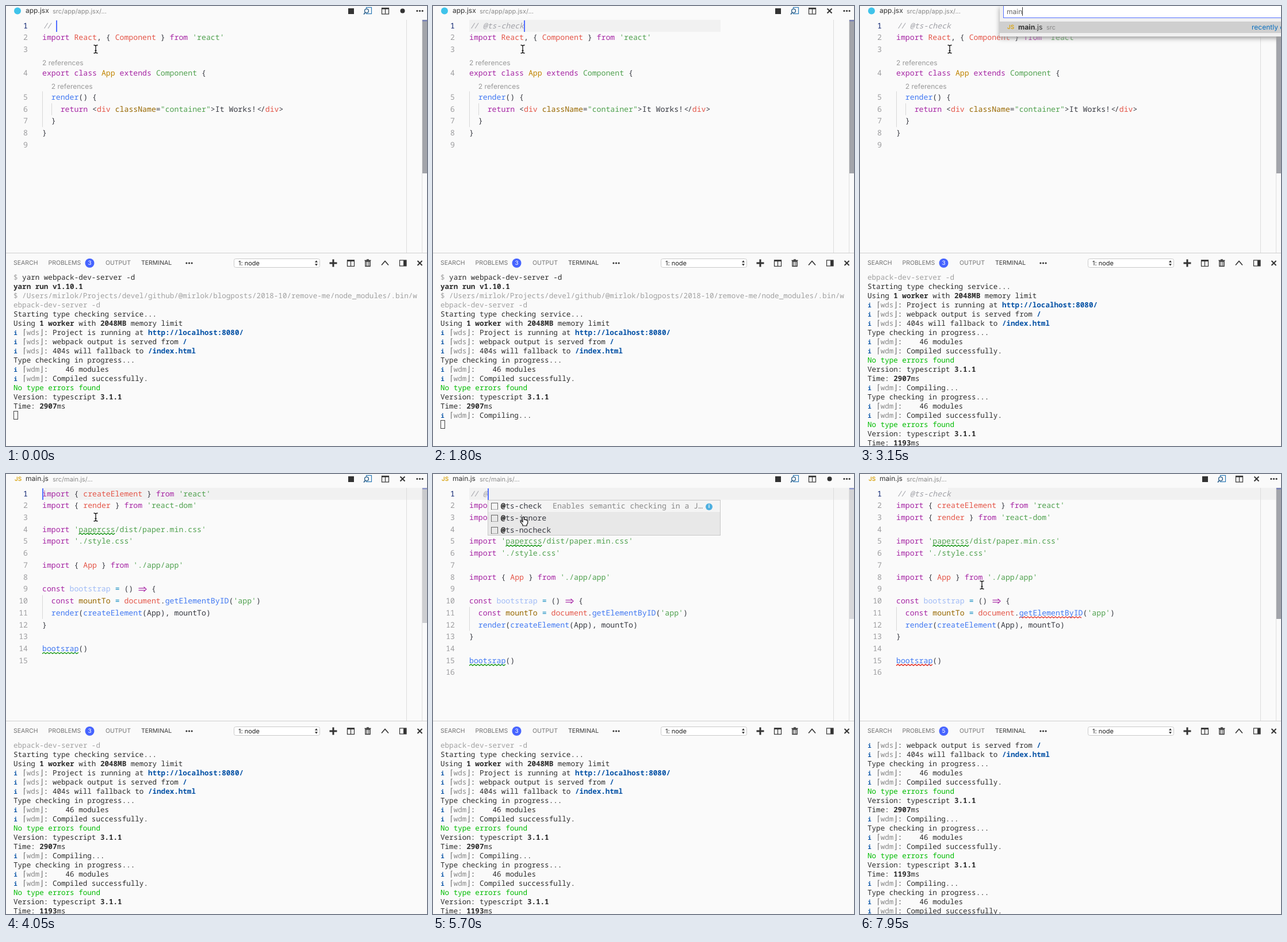
Recreate the animation shown at these times as an HTML page with a canvas. Size 732x765 px, loop 8 s.

```html
<!DOCTYPE html>
<html lang="en">
<head>
<meta charset="utf-8">
<title>Type checking a script file</title>
<style>
  html, body { margin: 0; width: 100%; height: 100%; overflow: hidden; background: #fafafa; }
  #stage { position: absolute; left: 0; top: 0; width: 732px; height: 765px; overflow: hidden;
    font-family: Inter, "Open Sans", sans-serif; text-rendering: geometricPrecision; color: #383a42; }
  #stage canvas, #text, #front { position: absolute; left: 0; top: 0; }
  .t { position: absolute; white-space: pre; line-height: 20px; }
  .code { font: 13.2px/20.73px "Noto Sans Mono", "DejaVu Sans Mono", monospace; }
  .term { font: 12.58px/16px "Noto Sans Mono", "DejaVu Sans Mono", monospace; color: #2c2c2c; }
  .num { width: 38px; text-align: right; color: #9d9d9f; }
  .num.on { color: #0b216f; }
  .lens { font-size: 12px; color: #999; }
  .lig { letter-spacing: -1.5px; padding: 0 1.5px; }
  .k { color: #a626a4 } .r { color: #e45649 } .s { color: #50a14f } .f { color: #4078f2 }
  .y { color: #c18401 } .a { color: #986801 } .o { color: #0184bc } .u { color: #a0bbf6 }
  .c { color: #a0a1a7; font-style: italic }
  .g { color: #888 } .l { color: #a0a0a0 } .n { color: #00bc00 }
  .h { color: #0451a5; font-weight: bold } .b { font-weight: bold }
  .i, .q { display: inline-block; width: 7.55px; text-align: center; line-height: 10px; }
  .i { color: #0451a5; font-weight: bold; font-size: 10.5px; }
  .q { color: #777; font-family: "DejaVu Sans Mono", monospace; font-size: 13.5px; }
  #caret { position: absolute; width: 2px; height: 20px; background: #526fff; }
  #popup { position: absolute; left: 95px; top: 45px; width: 403px; height: 60px; border: 1px solid #c8c8c8; background: #e8e8e8; overflow: hidden; }
  #popup b { color: #000; }
  #popup .first { position: absolute; left: 0; top: 0; width: 100%; height: 20px; background: #f4f4f4; }
  #popup .box { position: absolute; left: 5px; width: 10px; height: 10px; border: 1px solid #666; border-bottom-style: dotted; }
  #popup .info { position: absolute; left: 378px; top: 5px; width: 12px; height: 12px; border-radius: 6px;
    background: #4fb0e0; color: #fff; font: bold 9px/12px Inter, sans-serif; text-align: center; }
  #open { position: absolute; left: 243px; top: 0; width: 489px; background: #f0f0f0; box-shadow: 0 3px 8px #999; overflow: hidden; }
  #open .field { position: absolute; left: 6px; top: -3px; width: 500px; height: 22px; border: 1px solid #526fff; background: #fff; }
  #open .pick { position: absolute; left: 0; top: 27px; width: 100%; height: 20px; background: #cfcfcf; }
  #mouse { position: absolute; width: 24px; height: 24px; overflow: visible; }
</style>
</head>
<body>
<div id="stage">
  <canvas id="back" width="732" height="765"></canvas>
  <div id="text"></div>
  <div id="front"></div>
</div>
<script>
const LOOP = 8000, X0 = 63, CW = 7.92, Y0 = 24, LH = 20.73;
const g = document.getElementById('back').getContext('2d');
const textBox = document.getElementById('text');
const frontBox = document.getElementById('front');

// [k]word[] marks a coloured word
const mark = s => s.replace(/\[(\w)\](.*?)\[\]/g, '<span class="$1">$2</span>');
const put = (x, y, html, cls = '', style = '') =>
  `<div class="t ${cls}" style="left:${x}px;top:${y}px;${style}">${html}</div>`;
const label = (x, y, html, size, color, more = '') =>
  put(x, y - 10, html, '', `font-size:${size}px;color:${color};${more}`);
const rowY = row => Y0 + row * LH;
const colX = col => X0 + col * CW;

const comment = s => s.startsWith('//')
  ? `<span class="c"><span class="lig">//</span>${s.slice(2)}</span>` : s && `<span class="c">${s}</span>`;

const LENS = '2 references';
const appRows = [
  "[k]import[] [r]React[], { [r]Component[] } [k]from[] [s]'react'[]",
  '',
  { lens: 0 },
  '[k]export[] [k]class[] [y]App[] [k]extends[] [s]Component[] {',
  { lens: 2 },
  '  [f]render[]() {',
  '    [k]return[] &lt;[r]div[] [a]className[]=[s]"container"[]&gt;It Works!<span class="lig">&lt;/</span>[r]div[]&gt;',
  '  }',
  '}',
  ''
];
const mainRows = [
  "[k]import[] { [r]createElement[] } [k]from[] [s]'react'[]",
  "[k]import[] { [r]render[] } [k]from[] [s]'react-dom'[]",
  '',
  "[k]import[] [s]'papercss/dist/paper.min.css'[]",
  "[k]import[] [s]'./style.css'[]",
  '',
  "[k]import[] { [r]App[] } [k]from[] [s]'./app/app'[]",
  '',
  '[k]const[] [u]bootstrap[] [o]=[] ()    {',
  "  [k]const[] [a]mountTo[] [o]=[] [r]document[].[f]getElementByID[]([s]'app'[])",
  '  [f]render[]([f]createElement[](App), mountTo)',
  '}',
  '',
  '[f]bootsrap[]()',
  ''
];

const note = (tag, s) => `<span class="i">i</span> <span class="q">⌈</span>[g]${tag}[]<span class="q">⌋</span>: ${s}`;
const build = time => [
  'Type checking in progress...',
  note('wdm', '   46 modules'),
  note('wdm', 'Compiled successfully.'),
  '[n]No type errors found[]',
  'Version: typescript [b]3.1.1[]',
  `Time: [b]${time}[]ms`
];
const compiling = note('wdm', 'Compiling...');
const log = [
  '[l]$[] yarn webpack-dev-server -d',
  '[b]yarn run v1.10.1[]',
  '[l]$ /Users/mirlok/Projects/devel/github/@mirlok/blogposts/2018-10/remove-me/node_modules/.bin/w[]',
  '[l]ebpack-dev-server -d[]',
  'Starting type checking service...',
  'Using [b]1 worker[] with [b]2048MB[] memory limit',
  note('wds', 'Project is running at [h]http://localhost:8080/[]'),
  note('wds', 'webpack output is served from [h]/[]'),
  note('wds', '404s will fallback to [h]/index.html[]'),
  ...build(2907), compiling, ...build(1193), compiling, ...build(1120)
];

const files = [['JS', 'main.js', 'src'], ['', 'app.jsx', 'src/app'], ['', 'style.css', 'src'],
  ['JS', 'webpack.config.js', ''], ['', 'package.json', ''], ['', 'tsconfig.json', ''], ['', 'index.html', 'src']];

// each step changes only the listed parts of the picture
const steps = [
  [0, { file: 'app', text: '// ', caret: [0, 3], hl: null, dirty: 1, popup: 0, query: null, count: 15,
        bar: [291, 1], mouse: ['beam', 155, 75], errors: 0, dim: 1, row: 0 }],
  [300, { text: '// @', caret: [0, 4], hl: [63, 500, 0], popup: 1, mouse: ['hand', 157, 82] }],
  [750, { text: '// @ts-check', caret: [0, 12], popup: 0, mouse: ['beam', 155, 75] }],
  [1350, { dirty: 0 }],
  [1650, { count: 16 }],
  [1950, { count: 19 }],
  [2250, { query: '', caret: null, hl: null }],
  [2400, { query: 'm' }],
  [2700, { query: 'mai' }],
  [2850, { query: 'main' }],
  [3150, { count: 22 }],
  [3450, { file: 'main', text: null, query: null, hl: [63, 732, 0], caret: [0, 0], bar: [259, 1], dim: 0 }],
  [4050, { bar: [259, .5], dim: 1 }],
  [4200, { bar: [259, 0] }],
  [4500, { text: '', dirty: 1, row: 1, caret: [1, 0], hl: [63, 732, 1], bar: [252, .8] }],
  [4650, { bar: [252, .58] }],
  [4800, { row: 0, caret: [0, 0], hl: [63, 732, 0], bar: [252, .2] }],
  [4950, { text: '/', caret: [0, 1], bar: [252, 0] }],
  [5100, { text: '//', caret: [0, 2] }],
  [5250, { text: '// ', caret: [0, 3] }],
  [5550, { text: '// @', caret: [0, 4], popup: 1, mouse: ['hand', 157, 82], bar: [252, .9] }],
  [5700, { bar: [252, .4] }],
  [5850, { bar: [252, .1] }],
  [6000, { text: '// @ts-check', caret: [0, 12], popup: 0, hl: [697, 732, 0], mouse: ['beam', 155, 75], bar: [252, 0] }],
  [6600, { errors: 1, caret: null }],
  [7050, { dirty: 0, count: 23 }],
  [7200, { count: 24 }],
  [7350, { count: 26 }],
  [7650, { hl: [153, 732, 0], bar: [252, 1], mouse: ['beam', 167, 101] }],
  [7800, { mouse: ['beam', 193, 156] }],
  [7950, { mouse: ['beam', 211, 193] }]
];

function line(color, width, ...pts) {
  g.strokeStyle = color;
  g.lineWidth = width;
  g.beginPath();
  pts.forEach(([x, y], i) => i ? g.lineTo(x, y) : g.moveTo(x, y));
  g.stroke();
}
function rect(color, x, y, w, h) { g.fillStyle = color; g.fillRect(x, y, w, h); }
function frame(color, x, y, w, h, lw = 1) { g.strokeStyle = color; g.lineWidth = lw; g.strokeRect(x, y, w, h); }
function disc(color, x, y, r) { g.fillStyle = color; g.beginPath(); g.arc(x, y, r, 0, 7); g.fill(); }
function cross(x, y, r, w) {
  line('#333', w, [x - r, y - r], [x + r, y + r]);
  line('#333', w, [x + r, y - r], [x - r, y + r]);
}
function dots(x, y) { for (let i = -1; i < 2; i++) disc('#333', x + i * 4.6, y, 1.6); }
function split(x, y) {
  frame('#333', x - 5.5, y - 5, 12, 10.5, 1.2);
  rect('#333', x - 6, y - 5.5, 13, 2.6);
  line('#333', 1.2, [x + .5, y - 5], [x + .5, y + 5]);
}
function wave(color, row, col, len) {
  const y = rowY(row) + 17.8, x = colX(col), pts = [];
  for (let d = 0; d <= len * CW; d += 3) pts.push([x + d, y + (d % 6 ? -1.1 : 1.1)]);
  line(color, 1.3, ...pts);
}

function drawBack(s) {
  rect('#fafafa', 0, 0, 732, 765);
  if (s.hl) rect('#f1f1f1', s.hl[0], rowY(s.hl[2]), s.hl[1] - s.hl[0], LH);
  line('#dcdcdc', 1, [696.5, 24], [696.5, 429]);
  line('#dedede', 1, [723.5, 24], [723.5, 429]);

  // title bar icons
  if (s.file === 'app') disc('#3fc3ea', 20, 8.5, 6);
  rect('#333', 595, 4, 10, 10);
  frame('#2b79b5', 626.5, 2.5, 9, 11, 1.2);
  disc('#fafafa', 627, 8.5, 4);
  g.beginPath(); g.arc(627, 8.5, 3.4, 0, 7);
  g.strokeStyle = '#2b5f8a'; g.lineWidth = 1.4; g.stroke();
  line('#2b5f8a', 1.8, [625, 11], [622, 14.5]);
  split(659, 8.5);
  if (s.dirty) disc('#333', 689.5, 8.5, 4); else cross(689.5, 8.5, 4, 2);
  dots(719.5, 8.5);

  // scrollbar and cursor mark
  const [end, alpha] = s.bar;
  g.globalAlpha = alpha;
  rect('#a2a4aa', 724, 24, 8, end - 24);
  g.globalAlpha = 1;
  rect('rgba(70,90,200,.55)', 724, 24.5 + s.row * 11, 8, 2);

  // guides, arrow and squiggles
  if (s.file === 'app') {
    line('#d8d8d8', 1, [63.5, rowY(6)], [63.5, rowY(9)]);
    line('#d8d8d8', 1, [79.5, rowY(7)], [79.5, rowY(8)]);
  } else {
    const top = s.text === null ? 0 : 1, y = rowY(8 + top) + 10.5;
    line('#d8d8d8', 1, [63.5, rowY(9 + top)], [63.5, rowY(11 + top)]);
    line('#a626a4', 1.2, [230.5, y - 1.8], [242, y - 1.8]);
    line('#a626a4', 1.2, [230.5, y + 1.8], [242, y + 1.8]);
    line('#a626a4', 1.2, [239.5, y - 4.2], [244, y], [239.5, y + 4.2]);
    wave('#1c9a1c', 3 + top, 8, 8);
    wave(s.errors ? '#e02a20' : '#1c9a1c', 13 + top, 0, 8);
    if (s.errors) wave('#e02a20', 9 + top, 27, 14);
  }

  // panel bar
  line('#cfcfcf', 1, [0, 429.5], [732, 429.5]);
  disc('#4664ff', 145.5, 447, 8);
  dots(318.5, 447);
  g.beginPath(); g.roundRect(396.5, 439.5, 149, 15, 3);
  g.fillStyle = '#fff'; g.fill();
  g.strokeStyle = '#cacaca'; g.lineWidth = 1; g.stroke();
  for (const d of [-1, 1]) {
    g.fillStyle = '#333'; g.beginPath();
    g.moveTo(537, 447 + d * 1.3); g.lineTo(542, 447 + d * 1.3); g.lineTo(539.5, 447 + d * 4.8); g.fill();
  }
  rect('#333', 562.5, 445.5, 13, 3);
  rect('#333', 567.5, 440.5, 3, 13);
  split(599, 447);
  line('#333', 1.6, [623.5, 442.5], [634.5, 442.5]);
  line('#333', 1.4, [627, 441], [631, 441]);
  frame('#333', 625, 444, 8, 8.5, 1.5);
  for (const x of [627.5, 630.5]) line('#333', 1, [x, 444], [x, 452]);
  line('#333', 1.6, [653, 450.5], [659, 443.5], [665, 450.5]);
  frame('#333', 684.5, 442, 11.5, 10, 1.2);
  rect('#333', 691, 442, 5, 10);
  cross(719.5, 447, 4, 2);

  // terminal cursor
  const row = Math.min(s.count, 19);
  frame('#444', 13.5, 464.5 + row * 16, 7, 14);
}

function editorText(s) {
  const rows = s.file === 'app' ? appRows : mainRows;
  const all = s.text === null ? rows : [comment(s.text), ...rows];
  let n = 0;
  return all.map((r, i) => {
    const y = rowY(i) - .5;
    if (r.lens !== undefined) return put(colX(r.lens), y + 3, LENS, 'lens');
    const html = s.dim ? r : r.replace('[u]', '[f]');
    return put(0, y, ++n, 'code num' + (i === s.row ? ' on' : '')) + put(X0, y, mark(html), 'code');
  }).join('');
}

function barText(s) {
  const app = s.file === 'app';
  return (app ? '' : label(15, 8.5, 'JS', 10, '#d9a514', 'font-weight:600')) +
    label(34, 8, app ? 'app.jsx' : 'main.js', 12, '#333') +
    label(81, 8.5, app ? 'src/app/app.jsx/...' : 'src/main.js/...', 11, '#8a8a8a') +
    label(13, 447, 'SEARCH', 10.5, '#717171') +
    label(73.5, 447, 'PROBLEMS', 10.5, '#717171') +
    label(137.5, 447, s.errors ? 5 : 3, 10, '#fff', 'width:16px;text-align:center') +
    label(173, 447, 'OUTPUT', 10.5, '#717171') +
    label(235, 447, 'TERMINAL', 10.5, '#383838') +
    label(404, 447, '1: node', 11, '#222');
}

function terminalText(s) {
  const first = Math.max(0, s.count - 19);
  return log.slice(first, s.count).map((r, i) => put(13, 464 + i * 16, mark(r), 'term')).join('');
}

function popupHtml() {
  const names = ['check', 'ignore', 'nocheck'];
  return '<div id="popup"><div class="first"></div>' + names.map((n, i) => {
    const y = i * LH - .8;
    return `<div class="box" style="top:${Math.round(y) + 5}px"></div>` +
      put(22, y, `<b>@</b>ts-${n}`, 'code');
  }).join('') + put(112, -.8, 'Enables semantic checking in a J…', 'code', 'color:#888') +
    '<div class="info">i</div></div>';
}

function openHtml(q) {
  const list = q.length > 1 ? files.slice(0, 1) : files;
  const rows = list.map(([icon, name, dir], i) => {
    const y = 37 + i * 22, hit = q && name.startsWith(q) ? q.length : 0;
    return label(13, y, icon, 10, '#d9a514', 'font-weight:600') +
      label(32, y, `<b>${name.slice(0, hit)}</b>${name.slice(hit)} <span style="font-size:11px;color:#888"> ${dir}</span>`, 12.3, '#333') +
      (i ? '' : label(438, y, 'recently opened', 12, '#0a70c0'));
  }).join('');
  return `<div id="open" style="height:${31 + list.length * 22}px"><div class="field"></div><div class="pick"></div>` +
    label(12, 10, `${q}<span style="border-left:1px solid #333"></span>`, 12, '#666') + rows + '</div>';
}

function mouseHtml([kind, x, y]) {
  const path = kind === 'beam'
    ? '<path d="M-3.5-7Q-.5-7 0-5.5Q.5-7 3.5-7M0-6V6M-3.5 7Q-.5 7 0 5.5Q.5 7 3.5 7M-1.5 2.5H1.5" fill="none" stroke="#111" stroke-width="1.3"/>'
    : '<path d="M-2-7Q-.8-8.5.3-7L1-2.5 3-2.8 4-1.8 5.5-2 6.8 0 6.5 4 5 6V8H-2V6L-6 1Q-5.5-1-3.5.5L-2 1.5Z" fill="#fff" stroke="#111" stroke-width="1.2"/>';
  return `<svg id="mouse" style="left:${x + .5}px;top:${y}px">${path}</svg>`;
}

function render(s) {
  drawBack(s);
  textBox.innerHTML = barText(s) + editorText(s) + terminalText(s);
  const caret = s.caret
    ? `<div id="caret" style="left:${Math.round(colX(s.caret[1]))}px;top:${Math.round(rowY(s.caret[0])) + 1}px"></div>` : '';
  frontBox.innerHTML = caret + (s.popup ? popupHtml() : '') +
    (s.query === null ? '' : openHtml(s.query)) + mouseHtml(s.mouse);
}

let shown = -1;
function tick() {
  const t = performance.now() % LOOP;
  const now = steps.filter(([at]) => at <= t);
  if (now.length !== shown) {
    shown = now.length;
    render(Object.assign({}, ...now.map(([, part]) => part)));
  }
  requestAnimationFrame(tick);
}
tick();
</script>
</body>
</html>
```
